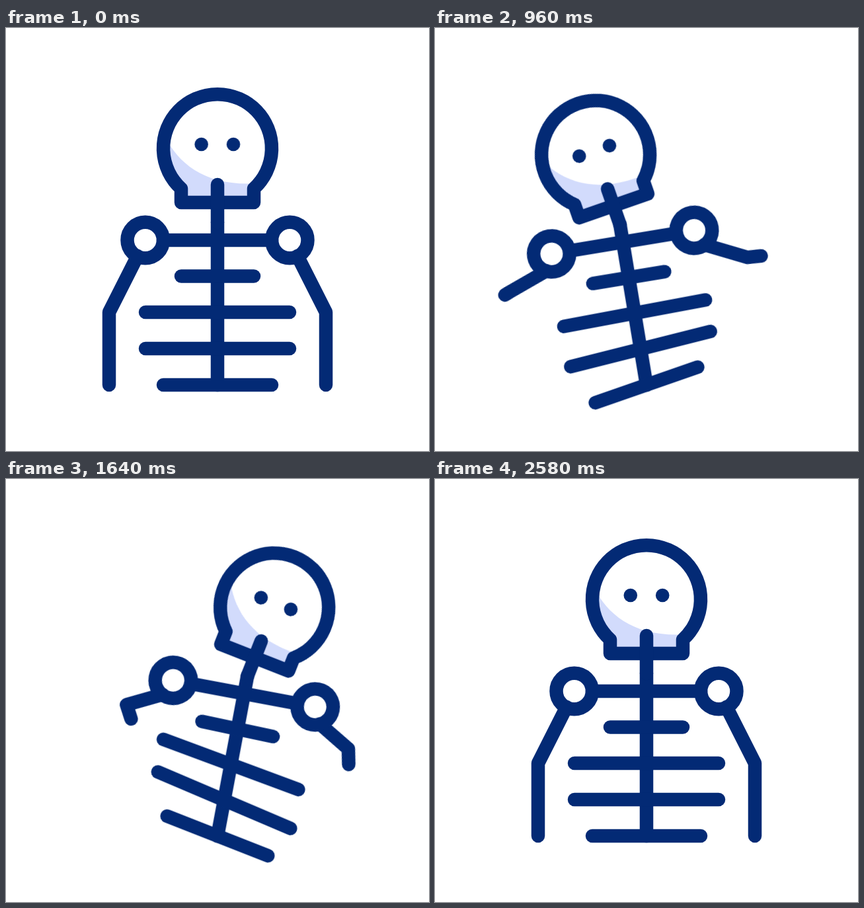
Recreate the animation shown at these times as an HTML page without scripts. Size 640x640 px, loop 2700 ms.

```html
<!DOCTYPE html>
<html lang="en">
<head>
<meta charset="utf-8">
<title>Dancing skeleton</title>
<style>
  html, body { margin: 0; width: 100%; height: 100%; overflow: hidden; background: #fff; }
  svg { display: block; width: 100%; height: 100%; }

  .line { fill: none; stroke: #032a75; stroke-width: 20.5; stroke-linecap: round; stroke-linejoin: round; }
  .eye { fill: #032a75; stroke: none; }
  .shade { fill: #d2dbfc; stroke: none; }

  .torso, .head, .rib, .eye, .shade, .arm {
    animation: 2700ms cubic-bezier(.333, 0, .667, 1) infinite;
  }

  /* The torso sways from the hip; head and ribs add their own sway, rippling upwards */
  .torso { animation-name: sway; transform-origin: 320px 540px; --a: -24deg; --b: 12.2deg; --c: -5.8deg; }
  .head, .rib { animation-name: sway; --a: -25deg; --b: 12.5deg; --c: -6.3deg; }
  .head { transform-origin: 320px 294px; }
  .r4 { transform-origin: 320px 540px; }
  .r3 { transform-origin: 320px 485px; animation-delay: 67ms; }
  .r2 { transform-origin: 320px 430px; animation-delay: 133ms; }
  .r1 { transform-origin: 320px 375.5px; animation-delay: 200ms; }
  @keyframes sway {
    0%, 28.444% { transform: rotate(0deg); }
    45.185% { transform: rotate(var(--a)); }
    57.963% { transform: rotate(var(--b)); }
    73.333% { transform: rotate(var(--c)); }
    87.407%, 100% { transform: rotate(0deg); }
  }

  /* Glance to the side */
  .eye { animation-name: glance; }
  .eye.near { --x: -35px; }
  .eye.far { --x: -44.5px; }
  @keyframes glance {
    0%, 28.444%, 100% { transform: translateX(0); }
    14.222% { transform: translateX(var(--x)); }
  }
  .shade { animation-name: shade; }
  @keyframes shade {
    0%, 28.444%, 100% { d: path("M240 163C262 208 305 240 380 235V270H230Z"); }
    14.222% { d: path("M240 192C262 234 305 250 380 235V270H230Z"); }
  }

  /* Arms are thrown up and out, then drop */
  .arm.left { animation-name: arm-left; }
  .arm.right { animation-name: arm-right; }
  @keyframes arm-left {
    0% { d: path("M199 345L156 430L156 540"); }
    28.444% { d: path("M199 345L156 430L156 540"); animation-timing-function: cubic-bezier(.333, 0, .667, .47); }
    35.556% { d: path("M199 345L139 368L131 372"); animation-timing-function: linear; }
    40% { d: path("M199 345L127 305L116 220"); animation-timing-function: cubic-bezier(.333, .5, .667, 1); }
    45.185%, 47.778% { d: path("M199 345L135 270L164 139"); }
    70%, 100% { d: path("M199 345L156 430L156 540"); }
  }
  @keyframes arm-right {
    0% { d: path("M441 345L484 430L484 540"); }
    28.444% { d: path("M441 345L484 430L484 540"); animation-timing-function: cubic-bezier(.333, 0, .667, .47); }
    35.556% { d: path("M441 345L502 375L523 377"); animation-timing-function: linear; }
    40% { d: path("M441 345L512 313L534 236"); animation-timing-function: cubic-bezier(.333, .5, .667, 1); }
    45.185%, 47.778% { d: path("M441 345L501 280.5L514 158"); }
    70%, 100% { d: path("M441 345L484 430L484 540"); }
  }
</style>
</head>
<body>
<svg viewBox="0 0 640 640">
  <defs>
    <path id="skull" d="M265 243A82 82 0 1 1 375 243V264H265Z"/>
    <clipPath id="inside"><use href="#skull"/></clipPath>
  </defs>
  <g class="torso line">
    <path class="arm left" d="M199 345L156 430L156 540"/>
    <path class="arm right" d="M441 345L484 430L484 540"/>
    <circle cx="210.7" cy="321" r="27.2"/>
    <circle cx="429.3" cy="321" r="27.2"/>
    <path d="M238 321H402M320 294V540"/>
    <path class="rib r1" d="M265 375.5H375"/>
    <path class="rib r2" d="M211 430H429"/>
    <path class="rib r3" d="M211 485H429"/>
    <path class="rib r4" d="M238 540H402"/>
    <g class="head">
      <g clip-path="url(#inside)">
        <path class="shade" d="M240 163C262 208 305 240 380 235V270H230Z"/>
      </g>
      <use href="#skull"/>
      <path d="M320 237V294"/>
      <circle class="eye near" cx="295.8" cy="176" r="10.3"/>
      <circle class="eye far" cx="344.2" cy="176" r="10.3"/>
    </g>
  </g>
</svg>
</body>
</html>
```
